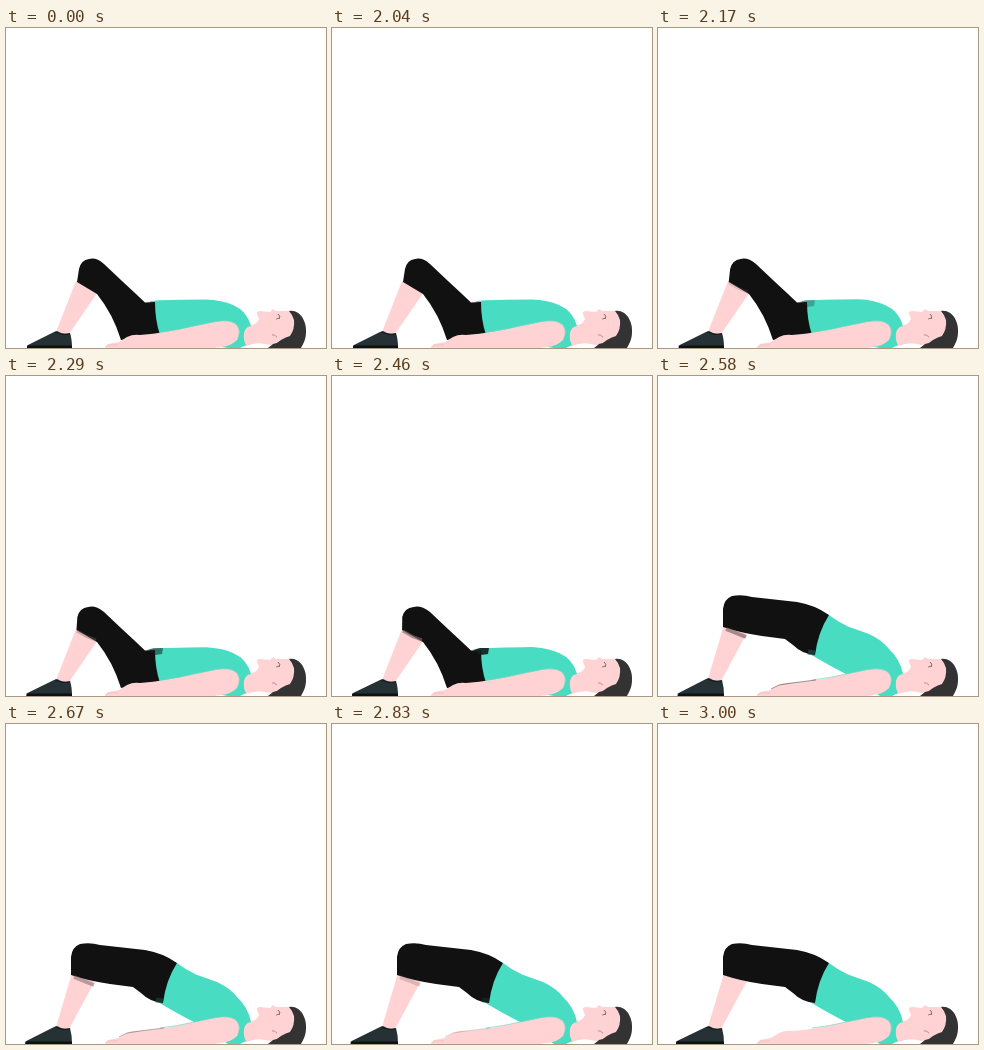
Animation, 320 px wide and 320 px high, one loop 7.54 s. Source, as an HTML page with a canvas:

```html
<!DOCTYPE html>
<html lang="en">
<head>
<meta charset="utf-8">
<title>Bridge exercise</title>
<style>
  html, body { margin: 0; width: 100%; height: 100%; overflow: hidden; background: #fff; }
  canvas { display: block; width: 100vw; height: 100vh; object-fit: contain; }
</style>
</head>
<body>
<canvas id="stage" width="320" height="320"></canvas>
<script>
const ctx = document.getElementById('stage').getContext('2d');
const LOOP = 7540, FADE = 2040, LIFT = 2500, REST = 3000;
const SKIN = '#ffd3d3', PANTS = '#111111', SHIRT = '#48dcc2', SHOE = '#263135', HAIR = '#333333';
const COLLAR = 'Q239 299 238 305 Q237 312 240 317 L234 320 L222 320';

const clamp = v => Math.max(0, Math.min(1, v));

function fill(d, color, alpha = 1) {
  ctx.globalAlpha = alpha;
  ctx.fillStyle = color;
  ctx.fill(new Path2D(d));
  ctx.globalAlpha = 1;
}

function line(d, color, width, alpha = 1) {
  ctx.globalAlpha = alpha;
  ctx.strokeStyle = color;
  ctx.lineWidth = width;
  ctx.stroke(new Path2D(d));
  ctx.globalAlpha = 1;
}

function head() {
  fill('M234 300 L246 297 Q251 296 253 291 L251 286 Q250 283 254 283 L264 284 L267 281 L270 283 L284 283 L291 292 L288 307 L272 316 L263 317 Q252 313 240 318 L234 318 Z', SKIN);
  fill('M283 283 C294 281 301 294 300 304 C300 312 297 316 295 320 L262 320 L267 316 Q272 315 275 312 Q280 309 284 308 Q289 301 288 292 Q286 286 283 283 Z', HAIR);
  fill('M267 306 Q273 302 274 307 Q274 313 268 314 Q264 312 267 306 Z', SKIN);
  line('M266 307 Q268 306 271 309', '#b98c91', 1);
  line('M272 286 Q275 288 273 291', '#77656b', 1);
  line('M270 291 L274 290', '#77656b', 0.8);
}

function arm() {
  fill('M99 320 L102 316 L113 314 L121 309 Q127 306 134 307 Q160 305 188 298 L210 293.5 Q225 291 231 297 Q236 304 231 312 Q225 318 215 319 L208 320 Z', SKIN);
  line('M154 304 Q172 302 188 298 L210 293.5 Q225 291 231 297 Q235 303 232 310', '#73d3c0', 0.7);
  line('M99 319 L103 317 L112 317', '#e9b9bc', 0.7);
}

function shoe(x, y) {
  fill(`M${x} 320 L${x + 1} 317 L48 ${y} L51 ${y - 1} Q57 ${y + 3} 64 ${y + 1} Q66 311 66 320 Z`, SHOE);
  line(`M49 ${y} Q57 ${y + 4} 64 ${y + 2}`, '#111c20', 1);
  line(`M${x} 318.8 L66 318.8`, '#0b1215', 2.4);
}

// d: how far the resting knee has drifted, 0..1
function lying(d) {
  const k = 3 * d;
  fill('M70 253 L92 264 L63 306 Q56 309 50 304 Z', SKIN);
  shoe(21 - d, 304);
  fill(`M144 273 Q160 271.5 200 ${271.5 - d / 2} Q216 272 227 277 Q241 283 245 298 ${COLLAR} L146 307 Z`, SHIRT);
  fill(`M${71 - k / 3} 254 L${73 - k} 241 Q${75 - k} 232 ${83 - k / 2} 231 Q${90 - k / 2} 229 98 236 L116 253 Q128 264 139 274.5 L149 274 Q149 292 154 307 L115 312 Q107 286 91 266 Z`, PANTS);
  line('M71 255 Q80 261 90 264', '#796568', 3, 0.7 * d);
  fill('M141 274 L148 272 L157 272 L156 278 L149 279 Z', '#12211f', d);
}

// ghost: traces left by the change of pose, fading from 1 to 0
function raised(ghost) {
  fill('M66 249 L89 257 L63 305 Q57 308 50 303 Z', SKIN);
  shoe(18 + 2 * ghost, 303);
  fill(`M165 239 L171 239 Q180 246 190 250.5 L211 258 Q224 264 231 273 Q242 283 245 298 ${COLLAR} L188 298 Q172 290 152 278 Z`, SHIRT);
  fill('M65 251 L65 233 Q66 223 74 220 Q84 218 94 221 L139 226 Q157 229 171 239 Q160 256 157 279 Q144 278 135 269 L127 263 L104 260 Q83 257 65 251 Z', PANTS);
  line('M68 253 L88 261', '#796568', 4, 0.8 * ghost);
  line('M150 276 L157 277', '#1c5148', 5, 0.8 * ghost);
}

function draw(t) {
  ctx.fillStyle = '#fff';
  ctx.fillRect(0, 0, 320, 320);
  const up = t >= LIFT;
  const ghost = clamp((REST - t) / (REST - LIFT));
  head();
  if (up) raised(ghost);
  else lying(clamp((t - FADE) / (LIFT - FADE)));
  arm();
  if (up) line('M113 313 L121 309 L134 307 L158 304', '#222', 0.8, 0.7 * ghost);
}

const start = performance.now();
function tick() {
  draw((performance.now() - start) % LOOP);
  requestAnimationFrame(tick);
}
tick();
</script>
</body>
</html>
```
